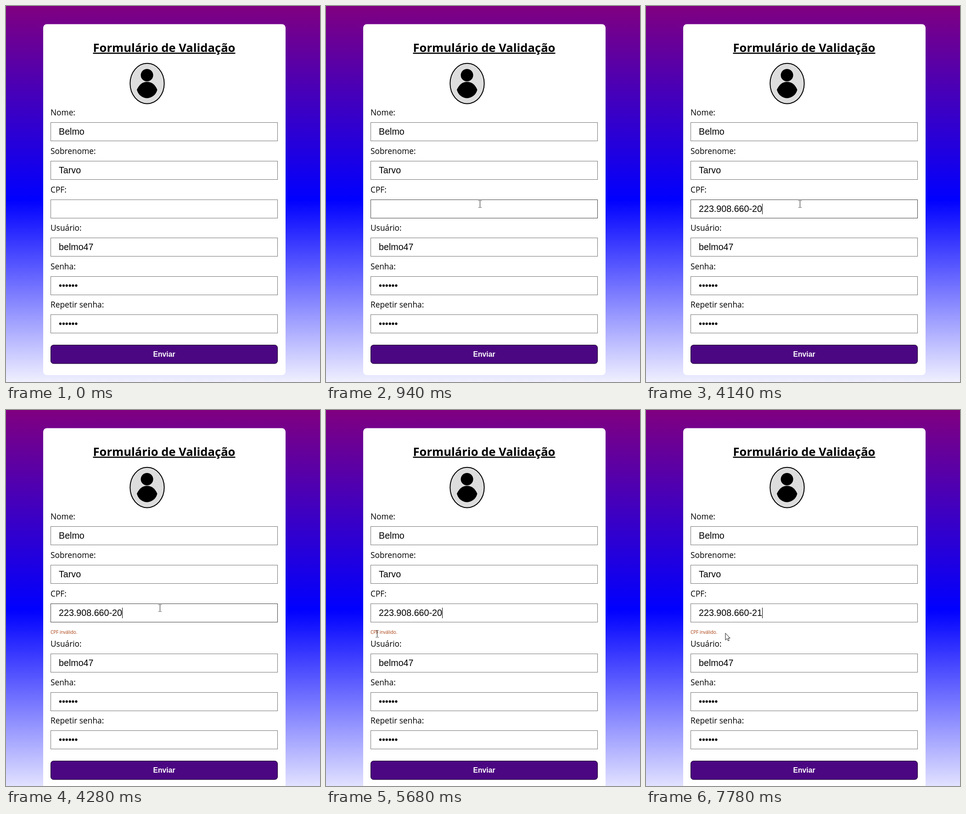
Write an HTML page that moves like this. It is 684 by 818 pixels and loops after 8 s.

```html
<!DOCTYPE html>
<html lang="pt-BR">
<head>
<meta charset="utf-8">
<title>Formulário de Validação</title>
<style>
  html, body { margin: 0; width: 100%; height: 100%; overflow: hidden; }
  svg { display: block; width: 684px; height: 818px; }
  .label { font: 17.34px "Open Sans", sans-serif; }
  .value { font: 19.7px "Liberation Sans", Arial, sans-serif; }
  .title { font: bold 25.6px "Open Sans", sans-serif; text-decoration: underline; }
  .error { font: 9.87px "Open Sans", sans-serif; fill: #a63c0c; }
  .button { font: bold 15.76px "Liberation Sans", Arial, sans-serif; fill: #fff; }
</style>
</head>
<body>
<svg id="stage" viewBox="0 0 684 818">
  <defs>
    <linearGradient id="sky" gradientUnits="userSpaceOnUse" x1="0" y1="0" x2="0" y2="843">
      <stop offset="0" stop-color="#800080"/>
      <stop offset=".5" stop-color="#00f"/>
      <stop offset="1" stop-color="#fff"/>
    </linearGradient>
  </defs>
  <rect width="684" height="818" fill="url(#sky)"/>
  <rect id="card" x="81" y="39.5" width="528" height="763.5" rx="8" fill="#fff"/>
  <text class="title" x="344.5" y="99.5" text-anchor="middle">Formulário de Validação</text>
  <g id="avatar">
    <ellipse cx="307.5" cy="168.6" rx="37.2" ry="43.8" fill="#ddd" stroke="#000" stroke-width="2"/>
    <circle cx="307.1" cy="150.5" r="13.5"/>
    <path d="M285 182C291 170 298 165 307 165C317 165 324 170 329.5 182C327 194 316 200.5 307 200.5C298 200.5 288 194 285 182Z"/>
  </g>
  <g id="upper"></g>
  <text id="error" class="error" x="97" y="487">CPF inválido.</text>
  <g id="lower">
    <rect x="97.5" y="737.5" width="494" height="40.5" rx="6" fill="#4b0682" stroke="#140020"/>
    <text class="button" x="344.5" y="763" text-anchor="middle">Enviar</text>
  </g>
  <rect id="caret" y="430" width="1" height="23"/>
  <path id="beam" fill="none" stroke="#222" d="M-3 -7.5H-1L0 -6.5L1 -7.5H3M0 -6.5V6.5M-3 7.5H-1L0 6.5L1 7.5H3"/>
  <path id="arrow" fill="#fff" stroke="#111" stroke-linejoin="round" d="M.5 .5V15.5L4 12.2L6.3 17.2L8.6 16.2L6.4 11.3H10.6Z"/>
</svg>
<script>
const LOOP = 8000;
const SHIFT = 26;
const $ = id => document.getElementById(id);

function add(parent, tag, attrs, text = "") {
  const node = document.createElementNS("http://www.w3.org/2000/svg", tag);
  for (const name in attrs) node.setAttribute(name, attrs[name]);
  node.textContent = text;
  return parent.appendChild(node);
}

const dots = "•".repeat(6);
const fields = [
  ["Nome:", "Belmo"], ["Sobrenome:", "Tarvo"], ["CPF:", ""],
  ["Usuário:", "belmo47"], ["Senha:", dots], ["Repetir senha:", dots]
].map(([label, value], i) => {
  const group = i < 3 ? $("upper") : $("lower");
  const top = Math.round(253.3 + 83.6 * i);
  add(group, "text", { class: "label", x: 97, y: top - 15 }, label);
  const box = add(group, "rect", { x: 97.5, y: top + .5, width: 494, height: 40, fill: "#fff" });
  const text = add(group, "text", { class: "value", x: 115, y: top + 27 }, value);
  return { top, box, text, moves: i >= 3 };
});

// [time, x, y]; equal times make a jump
const pointerPath = [
  [70, 655, 797], [200, 610, 650], [330, 520, 440], [430, 440, 303],
  [520, 380, 330], [600, 345, 385], [670, 335, 416],
  [870, 335, 416], [870, 335, 427], [940, 335, 427], [940, 335, 431],
  [1080, 335, 431], [1080, 335, 416], [1160, 335, 416], [1160, 335, 431],
  [4900, 335, 431], [4940, 255, 442], [5000, 140, 455], [5070, 48, 462],
  [5210, 50, 464], [5400, 82, 478], [5680, 111, 487], [5950, 121, 485],
  [6020, 121, 485], [6400, 158, 495], [6700, 172, 485], [LOOP, 172, 485]
];

// [time, CPF text, caret x or 0 when hidden]
const stem = "223.908.660-2";
const typing = [
  [0, "", 0], [1160, "", 115], [1620, "", 0],
  [2020, stem + "6", 253], [2410, stem, 242], [2540, stem, 0],
  [3090, stem + "0", 253], [3620, stem + "0", 0],
  [4140, stem + "0", 253], [4670, stem + "0", 0],
  [5210, stem + "0", 253], [5740, stem + "0", 0],
  [6260, stem + "0", 253], [6780, stem + "0", 0],
  [7310, stem + "0", 253], [7580, stem, 242], [7780, stem + "1", 253]
];

const lastAt = (list, t) => list.filter(item => item[0] <= t).pop();

function pointerAt(t) {
  const from = lastAt(pointerPath, t);
  if (!from) return null;
  const to = pointerPath.find(key => key[0] > t) || from;
  const k = to === from ? 0 : (t - from[0]) / (to[0] - from[0]);
  return [1, 2].map(i => Math.round(from[i] + (to[i] - from[i]) * k));
}

const inside = ([x, y], left, top, right, bottom) =>
  x >= left && x < right && y >= top && y < bottom;

function place(node, point, visible) {
  node.style.display = visible ? "" : "none";
  if (visible) node.setAttribute("transform", `translate(${point[0] + .5} ${point[1]})`);
}

function render(t) {
  const invalid = t >= 4280;
  const shift = invalid ? SHIFT : 0;
  $("sky").setAttribute("y2", 843 + shift);
  $("card").setAttribute("height", 763.5 + shift);
  $("lower").setAttribute("transform", `translate(0 ${shift})`);
  $("error").style.display = invalid ? "" : "none";

  const [, cpf, caretX] = lastAt(typing, t);
  fields[2].text.textContent = cpf;
  $("caret").style.display = caretX ? "" : "none";
  $("caret").setAttribute("x", caretX);

  const point = pointerAt(t);
  let overText = point && invalid && inside(point, 97, 477, 155, 492);
  for (const { top, box, moves } of fields) {
    const y = top + (moves ? shift : 0);
    const hover = point && inside(point, 97, y, 592, y + 41);
    box.setAttribute("stroke", hover ? "#444" : "#767676");
    overText = overText || hover;
  }
  place($("beam"), point, point && overText);
  place($("arrow"), point, point && !overText);
}

const start = performance.now();
function tick() {
  render((performance.now() - start) % LOOP);
  requestAnimationFrame(tick);
}
tick();
</script>
</body>
</html>
```
